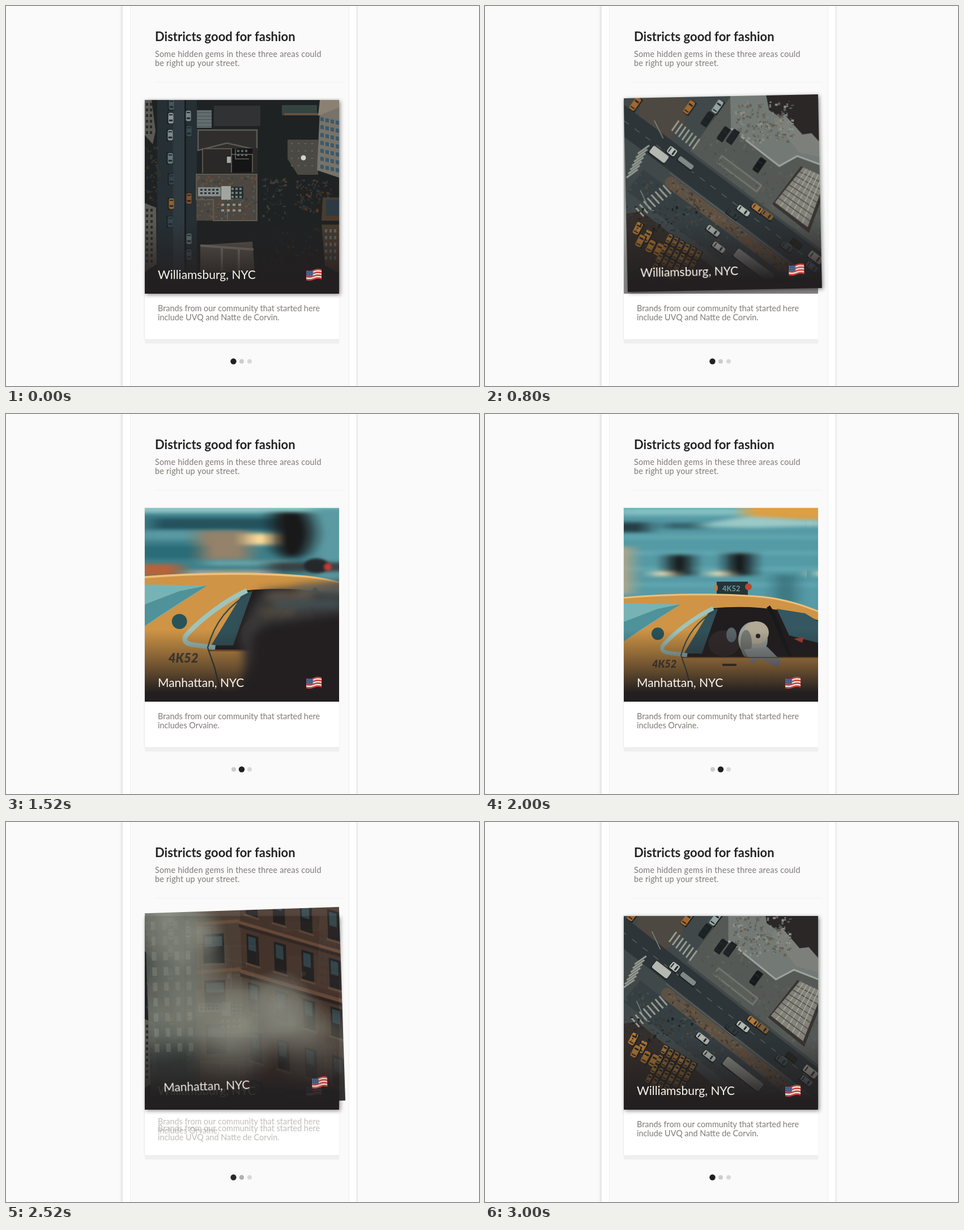
Animation, 835 px wide and 671 px high, one loop 3040 ms. Source, as an HTML page with a canvas:

```html
<!DOCTYPE html>
<html lang="en">
<head>
<meta charset="utf-8">
<title>Districts good for fashion</title>
<style>
html, body { margin: 0; width: 100%; height: 100%; overflow: hidden; background: #fafafa; }
canvas { display: block; }
</style>
</head>
<body>
<canvas id="stage" width="835" height="671"></canvas>
<script>
const LOOP = 3040, W = 343, H = 342, CX = 416.5, CY = 337, INK = '#231f20';
const FONT = 'Lato, "Open Sans", sans-serif';
const SWIPES = [700, 2300];
const ctx = document.getElementById('stage').getContext('2d');
let g; // context of the photo being painted

const clamp = v => Math.max(0, Math.min(1, v));
const ramp = (t, a, b) => { const u = clamp((t - a) / (b - a)); return u * u * (3 - 2 * u); };
const mix = (a, b, k) => a + (b - a) * k;

function random(seed) {
  return () => (seed = (seed * 16807) % 2147483647) / 2147483647;
}
function rect(color, x, y, w, h) {
  g.fillStyle = color;
  g.fillRect(x, y, w, h);
}
function path(color, d) {
  g.fillStyle = color;
  g.fill(new Path2D(d));
}
function line(color, width, d) {
  g.strokeStyle = color;
  g.lineWidth = width;
  g.stroke(new Path2D(d));
}
function oval(color, x, y, rx, ry = rx) {
  g.fillStyle = color;
  g.beginPath();
  g.ellipse(x, y, rx, ry, 0, 0, 7);
  g.fill();
}
function at(x, y, deg, draw) {
  g.save();
  g.translate(x, y);
  g.rotate(deg * Math.PI / 180);
  draw();
  g.restore();
}
function car(color, x, y, deg, len = 22, wid = 10) {
  at(x, y, deg, () => {
    rect('#1b2022', -len / 2 - 1, -wid / 2 + 1, len + 2, wid + 1);
    g.fillStyle = color;
    g.beginPath();
    g.roundRect(-len / 2, -wid / 2, len, wid, 3);
    g.fill();
    if (len < 30) {
      rect('#20282b', len * .14, -wid * .36, 3, wid * .72);
      rect('#20282b', -len * .36, -wid * .36, 2, wid * .72);
    }
  });
}
function specks(seed, n, x, y, w, h, colors) {
  const r = random(seed);
  for (let i = 0; i < n; i++)
    rect(colors[i % colors.length], x + r() * w, y + r() * h, 1 + r() * 4, 1 + r() * 4);
}
function windows(color, x, y, cols, rows, dx, dy, w, h) {
  for (let i = 0; i < cols * rows; i++)
    rect(color, x + (i % cols) * dx, y + Math.floor(i / cols) * dy, w, h);
}

function rooftops() {
  rect('#1f2223', 0, 0, W, H);
  rect('#252f34', 22, 0, 70, H);
  rect('#2e3a40', 50, 0, 20, H);
  rect('#191b1c', 70, 0, 3, H);
  // facades beside the avenue
  path('#5b5952', 'M0 0H12L19 55 14 78 0 62Z M0 182L20 190 21 290 0 304Z');
  windows('#282c2d', 2, 5, 2, 6, 7, 10, 4, 5);
  windows('#282c2d', 2, 192, 2, 10, 8, 10, 4, 5);
  specks(11, 60, 0, 80, 25, 100, ['#33302c', '#27333a', '#443427']);
  [[46, 32, '#8a9698'], [45, 62, '#7f8b8d'], [45, 103, '#66777c'], [47, 8, '#46565c'],
   [77, 28, '#77868a'], [78, 55, '#394950'], [47, 183, '#95612e'], [78, 174, '#80502b'],
   [78, 245, '#627175'], [78, 273, '#434e52'], [45, 215, '#34454b'], [47, 140, '#31434a']]
    .forEach(c => car(c[2], c[0], c[1], 90, 19, 9));
  // roofs
  rect('#626d70', 92, 18, 26, 31);
  windows('#475154', 92, 22, 1, 5, 1, 6, 26, 1);
  rect('#303233', 122, 10, 82, 36);
  rect('#302e2d', 94, 52, 104, 37);
  line('#5b5b56', 2.5, 'M94 89V53H198V88L145 76Z');
  rect('#2b2927', 102, 85, 97, 44);
  rect('#151516', 154, 86, 36, 42);
  line('#69665e', 1.5, 'M102 129V86H153V128M153 96H190V128M160 86V104H184');
  rect('#a4aaa5', 145, 100, 7, 11);
  windows('#576268', 163, 88, 3, 2, 7, 7, 4, 4);
  rect('#4c4740', 91, 131, 107, 82);
  line('#69665d', 1.5, 'M91 131H198V213H121V176H91Z M146 176V213');
  specks(5, 150, 92, 132, 104, 80, ['#5f5548', '#3c4040', '#6a4c35', '#555b59']);
  rect('#858c89', 94, 154, 40, 16);
  windows('#2c3233', 98, 157, 5, 2, 7, 6, 4, 3);
  rect('#a0a59f', 135, 152, 17, 24);
  rect('#262c2e', 152, 153, 22, 21);
  windows('#717c7d', 153, 155, 3, 3, 7, 7, 4, 4);
  windows('#8b908b', 135, 183, 4, 2, 10, 10, 5, 4);
  path('#5d564e', 'M98 256L190 250 194 304H98Z');
  line('#857e74', 4, 'M98 257L192 264M136 262V302M166 262V302');
  // court, trees and the tower on the right
  path('#4b4943', 'M252 70H306V132H270L252 104Z');
  windows('#66635b', 258, 76, 4, 4, 12, 13, 3, 2);
  oval('#d1d3ca', 280, 102, 4.5);
  rect('#34443f', 242, 9, 62, 18);
  rect('#655142', 246, 23, 60, 4);
  path('#77736a', 'M310 0H343V137L304 124Z');
  for (let i = 0; i < 4; i++) for (let j = 0; j < 7; j++)
    path('#3a5968', `M${310 + i * 9} ${30 + j * 14 + i * 2}l6 1v7l-6 -1z`);
  path('#8b8172', 'M309 0H343V13L306 28Z');
  specks(21, 170, 264, 140, 64, 56, ['#332d27', '#4b392b', '#27383f', '#201f1f']);
  specks(8, 75, 207, 135, 40, 75, ['#303435', '#463d34', '#23292b']);
  specks(9, 70, 220, 225, 85, 70, ['#252524', '#302a26']);
  path('#4a3c2e', 'M314 172H343V213H312Z M312 220H343V306L318 292Z');
  rect('#2c3b43', 320, 176, 23, 28);
  windows('#5c6970', 318, 228, 3, 5, 8, 12, 4, 6);
}

function zebra(x, y, dx, dy, deg, n, len) {
  for (let i = 0; i < n; i++)
    at(x + dx * i, y + dy * i, deg, () => rect('#959a92', -len / 2, -1.5, len, 3));
}
function crossing(s) {
  const drive = s * .09;
  rect('#414849', 0, 0, W, H);
  g.save();
  g.translate(s * .025, s * .094);
  path('#4d4841', 'M30 -90H105L98 20 65 45 18 6Z');
  at(30, 40, 38, () => {
    rect('#2d3538', -160, -23, 620, 45);
    rect('#555956', 76, -230, 360, 202);
    rect('#363f42', 30, 48, 420, 48);
    g.fillStyle = '#5b5145';
    g.beginPath();
    g.roundRect(72, 27, 300, 21, 10);
    g.fill();
    for (let i = 0; i < 18; i++) rect('#687072', -50 + i * 24, -1, 11, 1);
    rect('#687072', 70, 24, 330, 1);
    rect('#70736e', 125, -56, 90, 17);
    rect('#5a5e58', 128, -53, 84, 11);
    specks(31, 190, 80, 28, 280, 17, ['#77502f', '#443a32', '#675d4f']);
    specks(36, 200, 80, -130, 300, 100, ['#4b504f', '#60625d', '#56534c']);
    specks(37, 200, 30, 48, 400, 46, ['#404a4d', '#303a3e', '#54493c']);
  });
  path('#342f2b', 'M-60 180L20 170 190 310 190 420 -60 420Z');
  // buildings
  path('#737a75', 'M180 -100L180 28 264 96 297 79 390 111 390 -100Z');
  path('#2b2726', 'M235 -80L248 -4 285 20 305 50 390 92 390 -80Z');
  path('#7d807a', 'M255 12L275 4 306 40 322 38 343 62 343 82 300 72Z');
  line('#9da39c', 3, 'M180 27L264 95 296 78 350 99');
  specks(17, 190, 188, -20, 100, 70, ['#8a908a', '#5a605c', '#6b5e4d']);
  path('#383431', 'M302 96L351 120 314 214 250 162Z');
  path('#848279', 'M306 98L346 117 312 204 255 159Z');
  for (let i = 1; i < 8; i++) {
    const k = i / 8;
    line('#464e4d', 1.5, `M${306 - 51 * k} ${98 + 61 * k}L${346 - 34 * k} ${117 + 87 * k}`);
    if (i < 6) line('#aaaaa0', 1.5, `M${306 + 40 * i / 6} ${98 + 19 * i / 6}L${255 + 57 * i / 6} ${159 + 45 * i / 6}`);
  }
  zebra(4, 103, 3.5, -7, -35, 7, 25);
  zebra(16, 171, 7, -5.5, 49, 8, 21);
  zebra(82, 20, 6, 5.5, -54, 7, 22);
  line('#7c8882', 1.5, 'M45 10L60 42M18 133L32 165 45 172');
  // traffic
  const dx = drive * .79, dy = drive * .62;
  car('#b4b8b0', 75 - dx, 88 - dy, 38, 34, 15);
  car('#808887', 122 - dx, 104 - dy, 38, 31, 9);
  car('#b9beb7', 98 - dx, 83 - dy, 38, 16, 13);
  car('#b3b8b0', 215 - dx * .7, 185 - dy * .7, 38, 24);
  car('#30383a', 194 - dx * .6, 189 - dy * .6, 38);
  car('#b1783a', 224, 169, 38);
  car('#805d34', 241, 181, 38);
  car('#b0b4ac', 122 + dx, 189 + dy, 38, 25);
  car('#babeb6', 136 + dx * .8, 222 + dy * .8, 38, 24);
  car('#8c9089', 193 + dx, 252 + dy, 38, 81, 17);
  car('#29251f', 292, 232, 38, 20);
  car('#a6a79d', 325, 258, 38, 27, 13);
  car('#728083', 318, 274, 38);
  car('#3d484b', 274, 238, 38);
  [[107, -12, '#a3672f'], [157, -12, '#96a3a3'], [138, 9, '#1d2223'], [166, 36, '#1c2021'],
   [182, 41, '#202426'], [228, 92, '#171a1b'], [12, -20, '#a3672f']]
    .forEach(c => car(c[2], c[0], c[1], -54, 25, 11));
  [[12, 200], [28, 214], [16, 222], [34, 232], [48, 238]].forEach(p => car('#b77932', ...p, -62, 22, 11));
  for (let r = 0; r < 4; r++) for (let i = 0; i < 6; i++)
    car(i % 3 ? '#96672f' : '#ac7632', 67 + i * 10 - r * 9, 219 + i * 6 + r * 17, -62, 16, 8);
  specks(44, 90, -10, 160, 130, 45, ['#1d2021', '#39352f', '#2d3c42']);
  g.restore();
}

// horizontal motion blur
function smear() {
  g.save();
  g.globalAlpha = .5;
  [3, -6, 12, -20].forEach(d => g.drawImage(g.canvas, d, 0));
  g.restore();
}
function street(slide) {
  rect('#569ba6', -9, -9, 361, 361);
  rect('#83c0c2', 0, 0, W, 13);
  rect('#dda044', 218, -6, 140, 29);
  rect('#263e45', -5, 25, 55, 18);
  rect('#33616a', 75, 26, 70, 11);
  path('#9bcac8', 'M130 32L220 14 343 22V32L230 35Z');
  for (let i = 0; i < 7; i++) rect(i % 2 ? '#549aa5' : '#62a8b0', 0, 48 + i * 14, W, 7);
  rect('#b9a889', -9, 68, 28, 85);
  rect('#39717b', 275, 118, 32, 50);
  rect('#141415', 84 + slide, 83, 40, 36);
  rect('#141415', 189 + slide, 80, 42, 39);
  [57, 156, 335].forEach(x => rect('#ffebbc', x + slide, 112, 38, 8));
}
function trafficBlur() {
  rect('#3f818c', -20, -20, 383, 180);
  rect('#8cc5c4', -20, -9, 383, 18);
  rect('#24515c', 20, 18, 220, 20);
  rect('#5a9aa2', 0, 40, 100, 16);
  rect('#96826a', 98, 40, 92, 52);
  rect('#2b6c79', 0, 66, 105, 24);
  rect('#6ba2a6', 110, 92, 150, 10);
  rect('#ba6238', -30, 99, 98, 21);
  rect('#ffdc98', 184, 45, 52, 20);
  rect('#5c9ba4', 300, 0, 60, 130);
  path('#191718', 'M232 8H290Q318 45 290 80L262 92 236 76Z');
  rect('#3b4142', 225, 96, 130, 16);
  rect('#b0aa94', 80, 110, 150, 9);
}
function taxi(t) {
  const near = 1 - ramp(t, 1480, 1980);
  g.save();
  g.filter = 'blur(3px)';
  street((2000 - t) * .05);
  g.globalAlpha = near;
  trafficBlur();
  g.restore();
  smear();

  g.save();
  const scale = mix(1, 1.22, near);
  g.translate(-12 * near, -71 * near);
  g.scale(scale, scale);
  g.globalAlpha = 1 - near;
  rect('#253338', 164, 130, 55, 25);
  oval('#b94935', 220, 139, 6);
  oval('#c47842', 163, 141, 3, 6);
  g.fillStyle = '#6f9b9b';
  g.font = `bold 13px ${FONT}`;
  g.fillText('4K52', 174, 147);
  g.globalAlpha = 1;
  path('#cf9445', 'M-5 158C90 149 190 151 245 156 292 161 325 174 360 188V360H-5Z');
  line('#ecc17c', 3, 'M-5 159C90 150 190 152 245 157 292 162 325 175 360 189');
  path('#77b3b4', 'M-5 168L100 170C72 189 35 212 -5 239Z');
  path('#4f929a', 'M-5 203L60 178 100 170C70 189 34 211 -5 239Z');
  path('#211d1e', 'M157 177C230 170 300 179 360 205V265H103Z');
  path('#315159', 'M152 181L166 178 138 257H106Z');
  line('#9ec4bd', 7, 'M158 177C128 191 91 218 69 243Q64 254 80 256L112 260');
  line('#314a4b', 2, 'M164 180C132 197 111 223 101 260L111 289 124 340');
  path('#345761', 'M270 178L320 186 343 200V238L292 225Z');
  line('#17191a', 7, 'M255 174C270 195 278 230 295 263');
  path('#b03a32', 'M300 231L318 228 315 238Z');
  // dogs at the window
  oval('#30292a', 177, 239, 28, 23);
  oval('#59646a', 190, 224, 9, 13);
  oval('#9ba19b', 228, 232, 26, 31);
  oval('#b3aa96', 234, 220, 22, 20);
  oval('#777b75', 216, 239, 10, 24);
  path('#92999a', 'M212 250L253 245 278 270 271 282 242 267 226 276Z');
  oval('#262426', 237, 226, 4);
  line('#8d572b', 2, 'M104 264H343');
  rect('#49321f', 174, 275, 25, 4);
  oval('#28535a', 60, 222, 11);
  g.fillStyle = '#4e4434';
  g.font = `italic 900 18px ${FONT}`;
  g.fillText('4K52', mix(50, 44, near), 282);
  g.restore();

  // blurred passer-by on the right
  g.save();
  g.globalAlpha = near;
  g.filter = 'blur(8px)';
  path('#3a3a3a', 'M205 148L360 128V350H155Q190 270 165 235L180 195Z');
  rect('#6f7474', 270, 138, 90, 10);
  rect('#7b654f', 215, 150, 80, 9);
  rect('#4d656c', 225, 165, 120, 9);
  rect('#6b5844', 205, 180, 60, 8);
  path(INK, 'M215 205L360 185V350H150Q200 300 190 225Z');
  g.filter = 'blur(2px)';
  oval('#24282a', 303, 102, 22, 13);
  oval('#c33c38', 323, 104, 7);
  g.restore();
}

function puff(x, y, r, a) {
  const f = g.createRadialGradient(x, y, 0, x, y, r);
  f.addColorStop(0, `rgba(150,151,139,${a})`);
  f.addColorStop(.55, `rgba(136,137,126,${a * .7})`);
  f.addColorStop(1, 'rgba(120,122,112,0)');
  rect(f, x - r, y - r, 2 * r, 2 * r);
}
function steam(t) {
  const drift = (t - 2520) * .018;
  rect('#3b4540', 0, 0, W, H);
  windows('#687066', 10, 15, 4, 9, 20, 27, 8, 15);
  path('#45342a', 'M88 0H343V342H88Z');
  rect('#4d4035', 88, 0, 80, H);
  [40, 122, 200].forEach(y => {
    rect('#1d1c1d', 101, y, 37, 52);
    rect('#34454a', 104, y + 5, 31, 17);
  });
  g.save();
  g.transform(1, .33, 0, 1, 165, 0);
  for (let row = -2; row < 5; row++) for (let i = 0; i < 4; i++) {
    const x = 13 + i * 48, y = row * 86 + 37;
    rect('#211e1e', x, y, 21, 52);
    rect('#304248', x + 3, y + 4, 13, 24);
    rect('#5c4637', x - 3, y + 52, 26, 4);
  }
  rect('#6b4a39', 0, 18, 180, 6);
  rect('#332722', 0, 24, 180, 6);
  rect('#6b4a39', 0, 104, 180, 7);
  rect('#2a211e', 0, 111, 180, 6);
  g.restore();
  line('#6b4e3b', 6, 'M88 22L166 19M88 107L166 104');
  [[40, 15, 75, .9], [65, 80, 85, .75], [95, 35, 48, .65], [20, 180, 90, .65], [100, 175, 90, .75],
   [170, 200, 95, .9], [230, 170, 65, .85], [255, 205, 70, .75], [140, 245, 85, .65], [300, 255, 85, .5]]
    .forEach(([x, y, r, a], i) => puff(x + drift * (i % 3 - .5), y - drift, r, a));
}

function flag(x, y) {
  for (let i = 0; i < 27; i++) {
    const top = y + 1.5 - i * .06 + 1.2 * Math.sin(i / 27 * 6.28 + .2);
    for (let j = 0; j < 7; j++) rect(j % 2 ? '#f0e9e4' : '#d3403c', x + i, top + j * 2.5, 1.1, 2.6);
    if (i < 12) {
      rect('#36507b', x + i, top, 1.1, 10);
      if (i % 3 == 1) [2, 5, 8].forEach(d => rect('#dfe4ea', x + i, top + d, 1, 1));
    }
  }
}

function makeCard(name, lines, shadow, photo) {
  const canvas = Object.assign(document.createElement('canvas'), { width: W, height: H });
  return { name, lines, shadow, photo, canvas, pen: canvas.getContext('2d') };
}
const cards = [
  makeCard('Williamsburg, NYC',
    ['Brands from our community that started here', 'include UVQ and Natte de Corvin.'], true, t => {
      const s = t < 2300 ? t : t - 2340;
      s < 400 ? rooftops() : crossing(s - 480);
    }),
  makeCard('Manhattan, NYC',
    ['Brands from our community that started here', 'includes Orvaine.'], false,
    t => t < 1240 || t > 2200 ? steam(t) : taxi(t))
];

function paint(card, t) {
  g = card.pen;
  card.photo(t);
  const shade = g.createLinearGradient(0, 215, 0, 326);
  shade.addColorStop(0, 'rgba(35,31,32,0)');
  shade.addColorStop(.6, 'rgba(35,31,32,.58)');
  shade.addColorStop(1, INK);
  rect(shade, 0, 215, W, H);
  g.font = `21px ${FONT}`;
  g.fillStyle = '#fbf7ef';
  g.fillText(card.name, 23, 316);
  flag(285, 299);
}
function place(card, p, alpha) {
  const lift = Math.sin(clamp(p / 240) * Math.PI / 2), fly = ramp(p, 230, 640);
  ctx.save();
  ctx.globalAlpha = alpha;
  ctx.translate(CX + mix(5.6 * lift, -13, fly), CY + mix(-10.6 * lift, -51, fly));
  ctx.rotate(-1.9 * lift * Math.PI / 180);
  if (card.shadow) {
    ctx.shadowColor = 'rgba(0,0,0,.45)';
    ctx.shadowBlur = 7;
    ctx.shadowOffsetX = ctx.shadowOffsetY = 2;
  }
  ctx.drawImage(card.canvas, -W / 2, -H / 2);
  ctx.restore();
}
function text(str, x, y, font, color, spacing = 0) {
  ctx.font = `${font} ${FONT}`;
  ctx.letterSpacing = spacing + 'px';
  ctx.fillStyle = color;
  ctx.fillText(str, x, y);
}
function body(lines, x, y, spacing) {
  lines.forEach((s, i) => text(s, x, y + i * 16, '14.4px', '#7f7b75', spacing));
}
function about(card, dy, alpha) {
  ctx.globalAlpha = alpha;
  body(card.lines, 268, 538.5 + dy, 0);
  ctx.globalAlpha = 1;
}

function backdrop() {
  g = ctx;
  rect('#fafafa', 0, 0, 835, 671);
  rect('#fff', 205, 0, 15, 671);
  rect('#fff', 605, 0, 15, 671);
  rect('#f2f2f2', 201, 0, 3, 671);
  rect('#dedede', 204, 0, 1.5, 671);
  rect('#eee', 219, 0, 1, 671);
  rect('#eee', 605, 0, 1, 671);
  rect('#dfdfdf', 619, 0, 1.3, 671);
  rect('#f1f1f1', 263, 134, 331, 1);
  text('Districts good for fashion', 263, 62, 'bold 22px', '#222');
  body(['Some hidden gems in these three areas could', 'be right up your street.'], 263, 89.5, .22);
  rect('#efefef', 245, 588, 343, 8);
  rect('#ededed', 243.5, 164.5, 345, 424);
  rect('#fff', 245, 166, 343, 422);
}
function dots(from, to, p) {
  for (let i = 0; i < 3; i++) {
    const on = i == to ? ramp(p, 100, 240) : i == from ? (1 - clamp((p - 100) / 400)) ** 5 : 0;
    const v = Math.round(mix(i < 2 ? 204 : 216, 32, on));
    g = ctx;
    oval(`rgb(${v},${v},${v})`, 402 + 14 * i - (i ? 0 : .5 * on), 627.5, 4 + 1.2 * on);
  }
}

function draw(t) {
  const second = t >= 1500;
  const p = Math.max(0, t - SWIPES[+second]);
  const from = +second, to = 1 - from;
  const k = ramp(p, 150, 290);
  backdrop();
  if (p > 0) {
    paint(cards[to], t);
    place(cards[to], 0, ramp(p, 0, 190));
  }
  if (p < 640) {
    paint(cards[from], t);
    place(cards[from], p, 1 - ramp(p, 140, 600));
  }
  about(cards[from], -8 * k, 1 - k);
  about(cards[to], 16 * (1 - k), k);
  dots(from, to, p);
}

const start = performance.now();
function tick(now) {
  draw(Math.max(0, now - start) % LOOP);
  requestAnimationFrame(tick);
}
draw(0);
requestAnimationFrame(tick);
</script>
</body>
</html>
```
